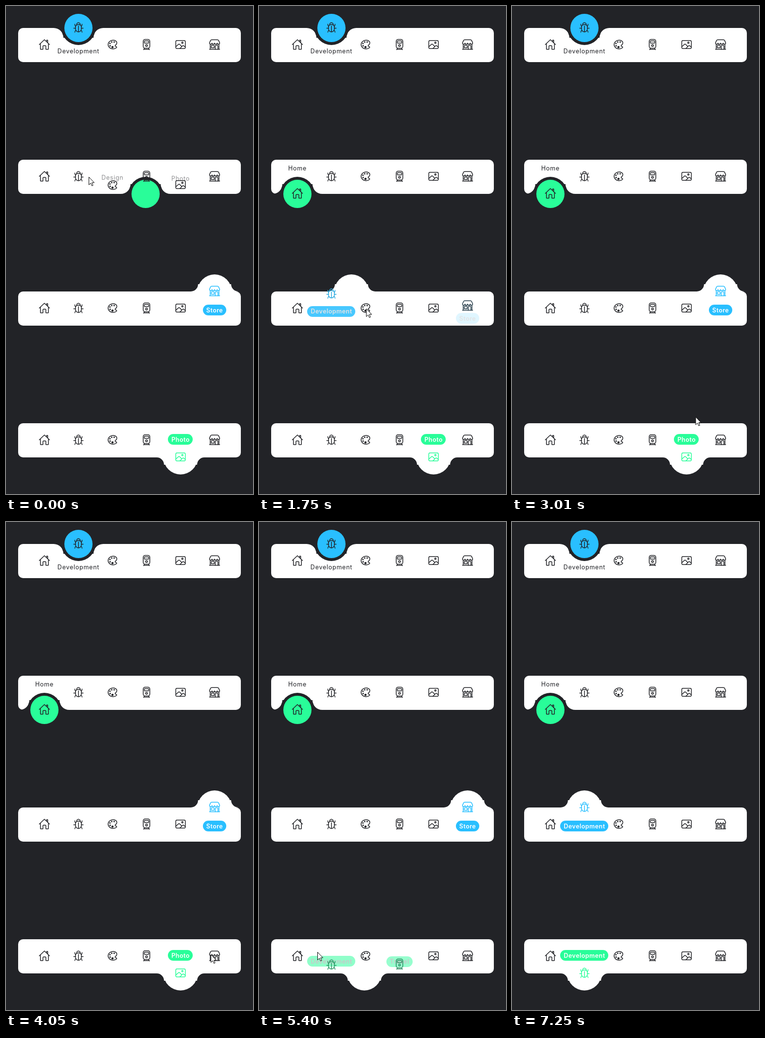
These frames come from a looping animation (508 px wide and 1000 px high, 8430 ms). An HTML page with a canvas:

```html
<!DOCTYPE html>
<html lang="en">
<head>
<meta charset="utf-8">
<title>Navigation bars</title>
<style>
  html, body { margin: 0; width: 100%; height: 100%; overflow: hidden; background: #222327; }
  canvas { display: block; width: 508px; height: 1000px; }
</style>
</head>
<body>
<canvas id="stage"></canvas>
<script>
const W = 508, H = 1000, LOOP = 8430, MOVE = 500, TICK = 125.6;
const DARK = [34, 35, 39], WHITE = [255, 255, 255];
const BLUE = [41, 191, 255], GREEN = [41, 253, 153];
const FONT = 'Inter, "Open Sans", sans-serif';

const canvas = document.getElementById('stage');
const ctx = canvas.getContext('2d');
const dpr = window.devicePixelRatio || 1;
canvas.width = W * dpr;
canvas.height = H * dpr;

// Icon parts, in a 512 unit box
const line = d => new Path2D(d);
const rect = (x, y, w, h, r) => {
  const p = new Path2D();
  p.roundRect(x, y, w, h, r);
  return p;
};
const arc = (x, y, r, from = 0, to = Math.PI * 2) => {
  const p = new Path2D();
  p.arc(x, y, r, from, to);
  return p;
};
const mirrored = half => {
  const p = new Path2D(half);
  p.addPath(half, new DOMMatrix([-1, 0, 0, 1, 512, 0]));
  return p;
};

const items = [
  { name: 'Home', parts: [
    mirrored(line('M80 212v236q0 16 16 16h96V328q0-24 24-24h40M32 256L245 52q5-4 11-4')),
    line('M400 179V64h-48v69')] },
  { name: 'Development', parts: [
    mirrored(line('M370 378c29 23 46 46 46 86M384 208c29-23 32-56 32-96M464 288h-80')),
    rect(128, 128, 256, 320, [{ x: 128, y: 96 }, { x: 128, y: 96 }, 128, 128]),
    arc(256, 128, 80, Math.PI - 0.2, 0.2),
    line('M256 192v256')] },
  { name: 'Design', parts: [
    line('M430 348c-7-6-16-8-25-9-11-2-16-4-22-10-15-13-15-31 0-44l30-27c46-41 46-108 0-149-34-30-80-45-128-45-55 0-114 20-158 60-84 74-84 195 0 268 41 37 97 55 152 56 56 0 112-18 151-53 14-12 12-36 0-47z')],
    dots: [arc(144, 208, 32), arc(152, 311, 32), arc(224, 144, 32), arc(328, 144, 32), arc(256, 367, 48)] },
  { name: 'Travel', parts: [
    rect(112, 32, 288, 384, 80),
    rect(160, 96, 192, 96, 24),
    arc(256, 296, 40),
    mirrored(line('M160 432l-32 48M148 464h108'))] },
  { name: 'Photo', parts: [
    rect(48, 80, 416, 352, 48),
    arc(336, 176, 32),
    line('M304 336l-91-91q-22-20-44-1L48 352M224 432l123-123q20-18 43-2L464 368')] },
  { name: 'Store', parts: [
    mirrored(line('M256 48H130c-22 0-42 12-50 30L36 173c-14 32 10 68 49 69c32 0 57-25 57-52 0 27 26 52 57 52s57-23 57-52M64 240v208M32 464h224')),
    rect(112, 288, 128, 112, [24, 24, 0, 0]),
    line('M288 464V312q0-24 24-24h64q24 0 24 24v152')] }
];
items.forEach((it, i) => { it.x = 79 + 70 * i; });

// dir: side of the active item (-1 up, 1 down); clicks: [time, item]
const bars = [
  { dir: -1, tint: BLUE, notch: true, label: 47.5, shift: 40, clicks: [[-1000, 1]] },
  { dir: 1, tint: GREEN, notch: true, label: 17.5, shift: 40, clicks: [[-1000, 4], [-150, 2], [350, 0]] },
  { dir: -1, tint: BLUE, label: 38, shift: 20, clicks: [[-1000, 5], [1480, 1], [2030, 3], [2530, 5], [6430, 1]] },
  { dir: 1, tint: GREEN, label: 33, shift: 25, clicks: [[-1000, 4], [4130, 5], [4690, 3], [5250, 1]] }
];
bars.forEach((bar, i) => { bar.y = 45 + 270 * i; });

// The pointer visits every clicked item, plus a few turning points.
const route = [
  { t: 0, x: 170, y: 350 }, { t: 880, x: 318, y: 543 }, { t: 1005, x: 211, y: 540 },
  { t: 2380, x: 429, y: 629 }, { t: 3250, x: 360, y: 916 }, { t: 3520, x: 327, y: 881 },
  { t: 4020, x: 421, y: 886 }, { t: 5400, x: 120, y: 881 }, { t: 6280, x: 159, y: 638 },
  { t: 6530, x: 162, y: 630 }, { t: 7130, x: 240, y: 700 }
];
for (const bar of bars)
  for (const [t, i] of bar.clicks)
    if (t > 0) route.push({ t, x: items[i].x, y: bar.y + 35 });
route.sort((a, b) => a.t - b.t);

const lerp = (a, b, k) => a + (b - a) * k;
const mix = (a, b, k) => a.map((v, i) => lerp(v, b[i], k));
const rgb = (c, a = 1) => `rgba(${c.map(Math.round).join()},${a})`;
const smooth = k => k * k * (3 - 2 * k);
const snap = t => Math.floor((t + 8) / TICK) * TICK;

// cubic-bezier(.25, .1, .25, 1)
function ease(k) {
  if (k <= 0) return 0;
  if (k >= 1) return 1;
  const curve = (u, a, b) => 3 * u * (1 - u) ** 2 * a + 3 * u * u * (1 - u) * b + u ** 3;
  let lo = 0, hi = 1;
  for (let i = 0; i < 24; i++) {
    const mid = (lo + hi) / 2;
    if (curve(mid, 0.25, 0.25) < k) lo = mid; else hi = mid;
  }
  return curve(lo, 0.1, 1);
}

function disc(x, y, r, color) {
  ctx.fillStyle = color;
  ctx.fill(arc(x, y, r));
}

function box(x, y, w, h, r, color) {
  ctx.fillStyle = color;
  ctx.fill(rect(x, y, w, h, r));
}

// Concave corners on both sides of the indicator, reaching in to its rim
function fillets(x, y, off, r, side, color) {
  const rim = Math.min(off - r, Math.sqrt(35 * 35 - r * r));
  ctx.fillStyle = color;
  for (const flip of [-1, 1]) {
    ctx.save();
    ctx.translate(x, y);
    ctx.scale(flip, side);
    ctx.beginPath();
    ctx.moveTo(off, 0);
    ctx.lineTo(rim, 0);
    ctx.lineTo(rim, r);
    ctx.arc(off, r, r, Math.PI, Math.PI * 1.5);
    ctx.fill();
    ctx.restore();
  }
}

function drawIndicator(bar, x) {
  const y = bar.dir < 0 ? bar.y : bar.y + 70;
  if (bar.notch) {
    disc(x, y, 35, rgb(DARK));
    fillets(x, y, 51, 20, -bar.dir, rgb(DARK));
    disc(x, y, 29, rgb(bar.tint));
  } else {
    disc(x, y, 35, rgb(WHITE));
    fillets(x, y, 49, 15, bar.dir, rgb(WHITE));
  }
}

function drawLabel(bar, it, p) {
  const y = bar.y + bar.label + bar.shift * (1 - p);
  ctx.font = `${bar.notch ? 400 : 600} 12.5px ${FONT}`;
  ctx.letterSpacing = bar.notch ? '0.75px' : '0.45px';
  if (bar.notch) {
    ctx.fillStyle = rgb(DARK, p);
  } else {
    const w = Math.round(ctx.measureText(it.name).width) + 14;
    box(Math.floor(it.x - w / 2), y - 11, w, 22, 11, rgb(bar.tint, p));
    ctx.fillStyle = rgb(mix(WHITE, mix(DARK, WHITE, p), p));
  }
  ctx.fillText(it.name, it.x, y + 4.5);
}

function drawIcon(bar, it, p) {
  ctx.save();
  ctx.translate(it.x, bar.y + 34 + 35 * bar.dir * p);
  ctx.scale(24 / 512, 24 / 512);
  ctx.translate(-256, -256);
  ctx.lineWidth = 32;
  ctx.lineCap = ctx.lineJoin = 'round';
  ctx.strokeStyle = ctx.fillStyle = rgb(bar.notch ? DARK : mix(DARK, bar.tint, p));
  it.parts.forEach(part => ctx.stroke(part));
  it.dots?.forEach(dot => ctx.fill(dot));
  ctx.restore();
}

function drawBar(bar, t) {
  const past = bar.clicks.filter(c => c[0] <= t);
  const [start, now] = past.at(-1);
  const prev = past.length > 1 ? past.at(-2)[1] : now;
  const k = prev === now ? 1 : ease((t - start) / MOVE);
  const level = i => i === now ? k : i === prev ? 1 - k : 0;

  box(25, bar.y, 458, 70, 10, rgb(WHITE));
  drawIndicator(bar, lerp(items[prev].x, items[now].x, k));
  items.forEach((it, i) => { if (level(i) > 0) drawLabel(bar, it, level(i)); });
  items.forEach((it, i) => drawIcon(bar, it, level(i)));
}

const arrow = line('M.5 .5V16.5L4.2 13L6.6 18.5L9 17.5L6.7 12H11.5Z');
const beam = line('M-3 -7.5H-1L0 -6.5L1 -7.5H3M0 -6.5V6.5M-3 7.5H-1L0 6.5L1 7.5H3');

function drawPointer(t) {
  const n = route.findIndex(s => s.t > t);
  if (n < 1) return;
  const a = route[n - 1], b = route[n];
  const k = smooth((t - a.t) / (b.t - a.t));
  const overText = t > 6500 && t < 6950;
  ctx.save();
  ctx.translate(lerp(a.x, b.x, k), lerp(a.y, b.y, k));
  ctx.lineWidth = 1;
  ctx.strokeStyle = '#000';
  ctx.fillStyle = '#fff';
  if (!overText) ctx.fill(arrow);
  ctx.stroke(overText ? beam : arrow);
  ctx.restore();
}

function draw(t) {
  ctx.setTransform(dpr, 0, 0, dpr, 0, 0);
  ctx.fillStyle = rgb(DARK);
  ctx.fillRect(0, 0, W, H);
  ctx.textAlign = 'center';
  bars.forEach(bar => drawBar(bar, t));
  drawPointer(t);
}

let origin;
function tick() {
  const now = performance.now();
  origin ??= now;
  draw(snap((now - origin) % LOOP));
  requestAnimationFrame(tick);
}
tick();
</script>
</body>
</html>
```
